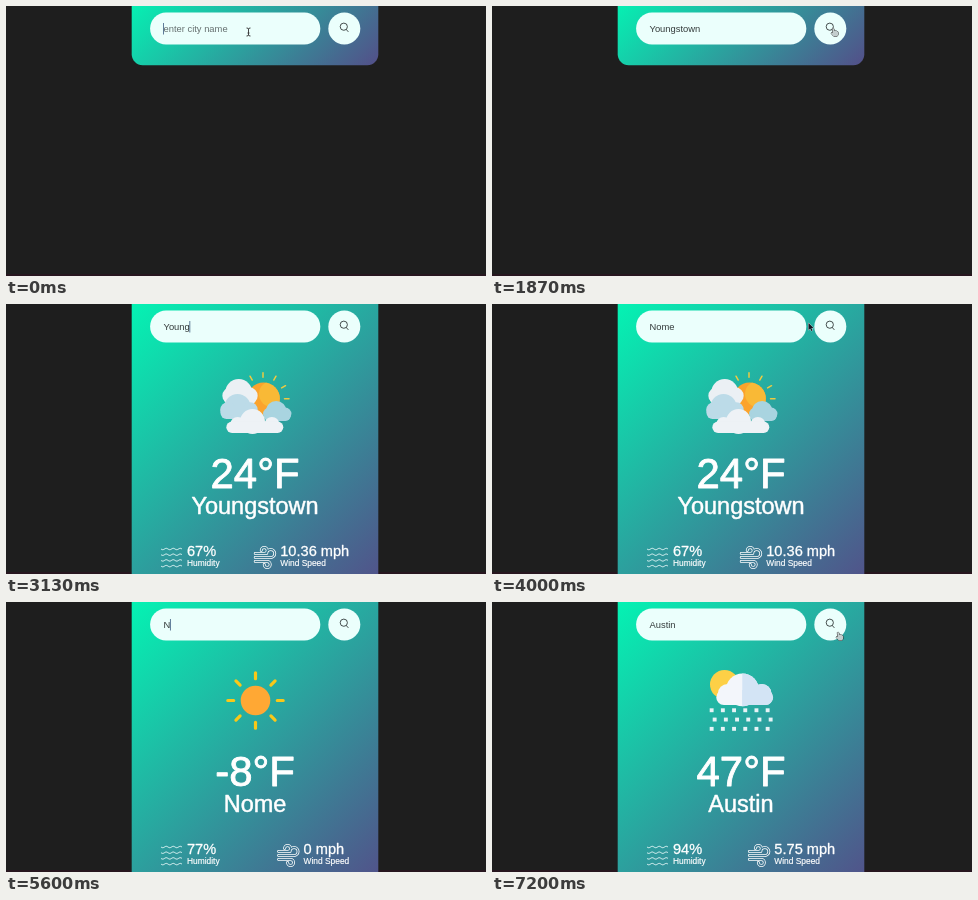
These frames come from a looping animation (480 by 270 pixels, 7.27 s). An HTML page with a canvas:

```html
<!DOCTYPE html>
<html lang="en">
<head>
<meta charset="utf-8">
<title>Weather search</title>
<style>
  html, body { margin: 0; width: 100%; height: 100%; overflow: hidden; background: #1e1e1e; }
  canvas { display: block; width: 480px; height: 270px; }
</style>
</head>
<body>
<canvas id="stage"></canvas>
<script>
const W = 480, H = 270;
const TICK = 1000 / 15, TICKS = 109;
const TAU = Math.PI * 2;
const FIELD = '#ebfffc', INK = '#343b3b';
const card = { x: 125.7, y: -14, w: 246.6, closed: 73.2, open: 301 };
const button = { x: 338.3, y: 22.5, r: 16 };

const canvas = document.getElementById('stage');
const ctx = canvas.getContext('2d');
const dpr = window.devicePixelRatio || 1;
canvas.width = W * dpr;
canvas.height = H * dpr;

// Each search, in ticks: type the city, move the pointer in an arc to the button, click
const searches = [
  { city: 'Youngstown', temp: '24°F', humidity: '67%', wind: '10.36 mph', icon: drawClouds,
    type: 7, move: 22, arrive: 28, click: 32, from: [242.5, 26], to: [341, 22], swing: [90, 20] },
  { city: 'Nome', temp: '-8°F', humidity: '77%', wind: '0 mph', icon: drawSun,
    type: 53, move: 58, arrive: 62, click: 64, from: [235.5, 25], to: [339, 22], swing: [-25, -9] },
  { city: 'Austin', temp: '47°F', humidity: '94%', wind: '5.75 mph', icon: drawRain,
    type: 86, move: 94, arrive: 101, click: 103, from: [235.5, 25], to: [346, 30], swing: [110, -17] }
];

// The previous city is erased letter by letter just before typing
searches.forEach((s, i) => {
  s.before = i ? searches[i - 1].city : '';
  s.next = searches[i + 1];
  s.begin = s.type - s.before.length;
});

const clamp = u => Math.min(1, Math.max(0, u));
const easeOut = u => 1 - (1 - u) ** 3;
const easeBoth = u => u * u * (3 - 2 * u);
const mix = (a, b, u) => a.map((v, i) => v + (b[i] - v) * u);

function currentSearch(n) {
  return searches.findLast(s => n >= s.begin);
}

function typedText(n) {
  const s = currentSearch(n);
  if (!s) return '';
  return n < s.type ? s.before.slice(0, s.type - n - 1) : s.city.slice(0, n - s.type + 1);
}

function caretShown(n) {
  const s = currentSearch(n);
  return s ? n < s.type + s.city.length + 3 : n < 1;
}

function pointerAt(n) {
  const s = currentSearch(n);
  if (!s) return searches[0].from;
  if (n < s.move) return s.next || n < s.move && n >= s.begin ? null : s.from;
  const back = clamp((n - s.click - 2) / 6);
  if (s.next && back) return mix(s.to, s.next.from, easeBoth(back));
  const u = easeOut(clamp((n - s.move) / (s.arrive - s.move)));
  const bow = Math.sin(u * Math.PI);
  return mix(s.from, s.to, u).map((v, i) => v + s.swing[i] * bow);
}

function setFont(size) {
  ctx.font = `${size}px "Liberation Sans", Arial, sans-serif`;
}

function textWidth(text, size) {
  setFont(size);
  return ctx.measureText(text).width;
}

function label(text, x, y, size, color) {
  setFont(size);
  ctx.fillStyle = color;
  ctx.fillText(text, x, y);
}

// White text of medium weight
function heading(text, x, y, size) {
  label(text, x, y, size, '#fff');
  ctx.strokeStyle = '#fff';
  ctx.lineWidth = size * 0.021;
  ctx.lineJoin = 'round';
  ctx.strokeText(text, x, y);
}

function centered(text, y, size) {
  heading(text, 249 - textWidth(text, size) / 2, y, size);
}

function disc(x, y, r, color) {
  ctx.beginPath();
  ctx.arc(x, y, r, 0, TAU);
  ctx.fillStyle = color;
  ctx.fill();
}

function pill(x, y, w, h, r, fill) {
  ctx.beginPath();
  ctx.roundRect(x, y, w, h, r);
  ctx.fillStyle = fill;
  ctx.fill();
}

// A flat-bottomed cloud with one large bump between two small ones
function cloud(x, base, w, h, color) {
  const big = h * 0.52, small = h * 0.31;
  disc(x + w * 0.46, base - h + big, big, color);
  disc(x + w * 0.2, base - h * 0.36, small, color);
  disc(x + w * 0.8, base - h * 0.36, small, color);
  pill(x, base - h * 0.48, w, h * 0.48, h * 0.24, color);
}

function clipped(addShape, paint) {
  ctx.save();
  ctx.beginPath();
  addShape();
  ctx.clip();
  paint();
  ctx.restore();
}

function rays(x, y, inner, outer, count, first, step, width, color) {
  ctx.strokeStyle = color;
  ctx.lineWidth = width;
  ctx.lineCap = 'round';
  ctx.beginPath();
  for (let i = 0; i < count; i++) {
    const a = first + i * step, c = Math.cos(a), s = Math.sin(a);
    ctx.moveTo(x + inner * c, y + inner * s);
    ctx.lineTo(x + outer * c, y + outer * s);
  }
  ctx.stroke();
  ctx.lineCap = 'butt';
}

function drawClouds() {
  rays(257, 94.7, 21.5, 26, 6, -TAU / 3, TAU / 12, 1.5, '#ecca42');
  disc(257.5, 94.7, 16.3, '#fba32c');
  clipped(() => ctx.arc(257.5, 94.7, 16.3, 0, TAU), () => disc(266, 90, 13, '#f9b936'));
  cloud(218, 101, 32, 26, '#ebf0f4');
  cloud(258, 117, 26.5, 20, '#a9d4e0');
  cloud(214.5, 115, 37, 25, '#bcdbe8');
  cloud(220.3, 129, 57, 24, '#eef2f6');
}

function drawSun() {
  rays(249.5, 98.5, 21.8, 27.7, 8, 0, TAU / 8, 3.2, '#fac818');
  disc(249.5, 98.5, 14.8, '#ffa834');
}

function drawRain() {
  disc(232.5, 82.5, 14.5, '#fdd046');
  const shape = color => cloud(224.3, 103, 56.7, 31.5, color);
  shape('#f3f6fb');
  clipped(() => ctx.rect(250.3, 60, 40, 50), () => shape('#d3e4f5'));
  ctx.fillStyle = '#e6f3f6';
  for (let row = 0; row < 3; row++)
    for (let i = 0; i < 6; i++)
      ctx.fillRect(217.7 + (row % 2) * 3 + i * 11.2, 106.3 + row * 9.3, 3.9, 3.9);
}

function drawWaves(x) {
  ctx.strokeStyle = '#f4ffff';
  ctx.lineWidth = 0.9;
  for (let row = 0; row < 4; row++) {
    ctx.beginPath();
    for (let i = 0; i <= 21; i += 0.5)
      ctx.lineTo(x + i, 245 + row * 5.7 + 0.7 * Math.sin(i / 7 * TAU));
    ctx.stroke();
  }
}

// A line ending in a curl; side is 1 for upward, -1 for downward
function gust(path, x, y, length, r, side) {
  path.moveTo(x, y);
  path.lineTo(x + length, y);
  path.arc(x + length, y - r * side, r, side * Math.PI / 2, -side * Math.PI, side > 0);
}

function drawWind(x, paint) {
  const path = new Path2D();
  gust(path, x + 1.5, 249.5, 9, 3, 1);
  gust(path, x + 1.5, 253.5, 15.5, 4, 1);
  gust(path, x + 1.5, 257.5, 12, 3, -1);
  ctx.lineCap = 'round';
  for (const [color, width] of [['#fff', 2.9], [paint, 1.3]]) {
    ctx.strokeStyle = color;
    ctx.lineWidth = width;
    ctx.stroke(path);
  }
  ctx.lineCap = 'butt';
}

// A 135 degree gradient, placed as CSS would place it on the card
function cardPaint(h) {
  const cx = card.x + card.w / 2, cy = card.y + h / 2, d = (card.w + h) / 4;
  const g = ctx.createLinearGradient(cx - d, cy - d, cx + d, cy + d);
  g.addColorStop(0, '#02f7b4');
  g.addColorStop(1, '#534f89');
  return g;
}

function detail(value, name, x) {
  heading(value, x, 252, 14.6);
  heading(name, x, 262.3, 8.4);
}

function drawReport(s, paint) {
  s.icon();
  centered(s.temp, 183.7, 41.9);
  centered(s.city, 210, 23.5);
  drawWaves(155);
  detail(s.humidity, 'Humidity', 181);
  const x = 343.2 - Math.max(textWidth(s.wind, 14.6), textWidth('Wind Speed', 8.4));
  drawWind(x - 26.5, paint);
  detail(s.wind, 'Wind Speed', x);
}

function drawSearch(n) {
  const text = typedText(n);
  pill(144.1, 6.5, 170.2, 31.9, 16, FIELD);
  label(text || 'enter city name', 157.5, 26, 9.4, text ? INK : '#667070');
  if (caretShown(n)) {
    ctx.fillStyle = '#3c5c80';
    ctx.fillRect(157.2 + textWidth(text, 9.4), 17, 0.8, 11.5);
  }
  disc(button.x, button.y, button.r, FIELD);
  ctx.strokeStyle = INK;
  ctx.lineWidth = 0.9;
  ctx.beginPath();
  ctx.arc(337.8, 20.7, 3.6, 0, TAU);
  ctx.moveTo(340.1, 23.3);
  ctx.lineTo(342.4, 25.9);
  ctx.stroke();
}

function outlined(shape, fill, stroke) {
  ctx.lineJoin = 'round';
  ctx.lineWidth = 0.9;
  ctx.strokeStyle = stroke;
  ctx.fillStyle = fill;
  ctx.stroke(new Path2D(shape));
  ctx.fill(new Path2D(shape));
}

function drawPointer([x, y]) {
  const overButton = Math.hypot(x - button.x, y - button.y) < button.r;
  const overField = x > 144 && x < 314 && y > 6 && y < 39;
  ctx.save();
  ctx.translate(x, y);
  if (overField)
    outlined('M-2-4Q0-4 0-3Q0-4 2-4M0-3V3M-2 4Q0 4 0 3Q0 4 2 4M-1 1H1', 'transparent', '#333');
  else if (overButton)
    outlined('M-.7.6Q0-.5.8.6L1.5 3Q3.4 2.4 4.1 3.5Q5.2 3.4 5.2 4.6L5 7L4 8.5H.9L-2 5.2Q-1.6 4.2-.3 5Z',
      '#c3cdcd', '#222');
  else
    outlined('M0 0V7L1.7 5.5L2.8 8L3.9 7.5L2.9 5.1H5Z', '#151822', '#d5dfe6');
  ctx.restore();
}

function draw(n) {
  ctx.setTransform(dpr, 0, 0, dpr, 0, 0);
  ctx.fillStyle = '#1e1e1e';
  ctx.fillRect(0, 0, W, H);
  ctx.fillStyle = '#27161f';
  ctx.fillRect(0, 268, W, 2);

  const report = searches.findLast(s => n >= s.click);
  const height = report ? card.open : card.closed;
  const paint = cardPaint(height);
  pill(card.x, card.y, card.w, height, 11, paint);
  if (report) drawReport(report, paint);
  drawSearch(n);
  const pointer = pointerAt(n);
  if (pointer) drawPointer(pointer);
}

function frame() {
  // The small lead keeps steps on time despite rounded clocks
  draw(Math.floor((performance.now() + 4) / TICK) % TICKS);
  requestAnimationFrame(frame);
}
frame();
</script>
</body>
</html>
```
